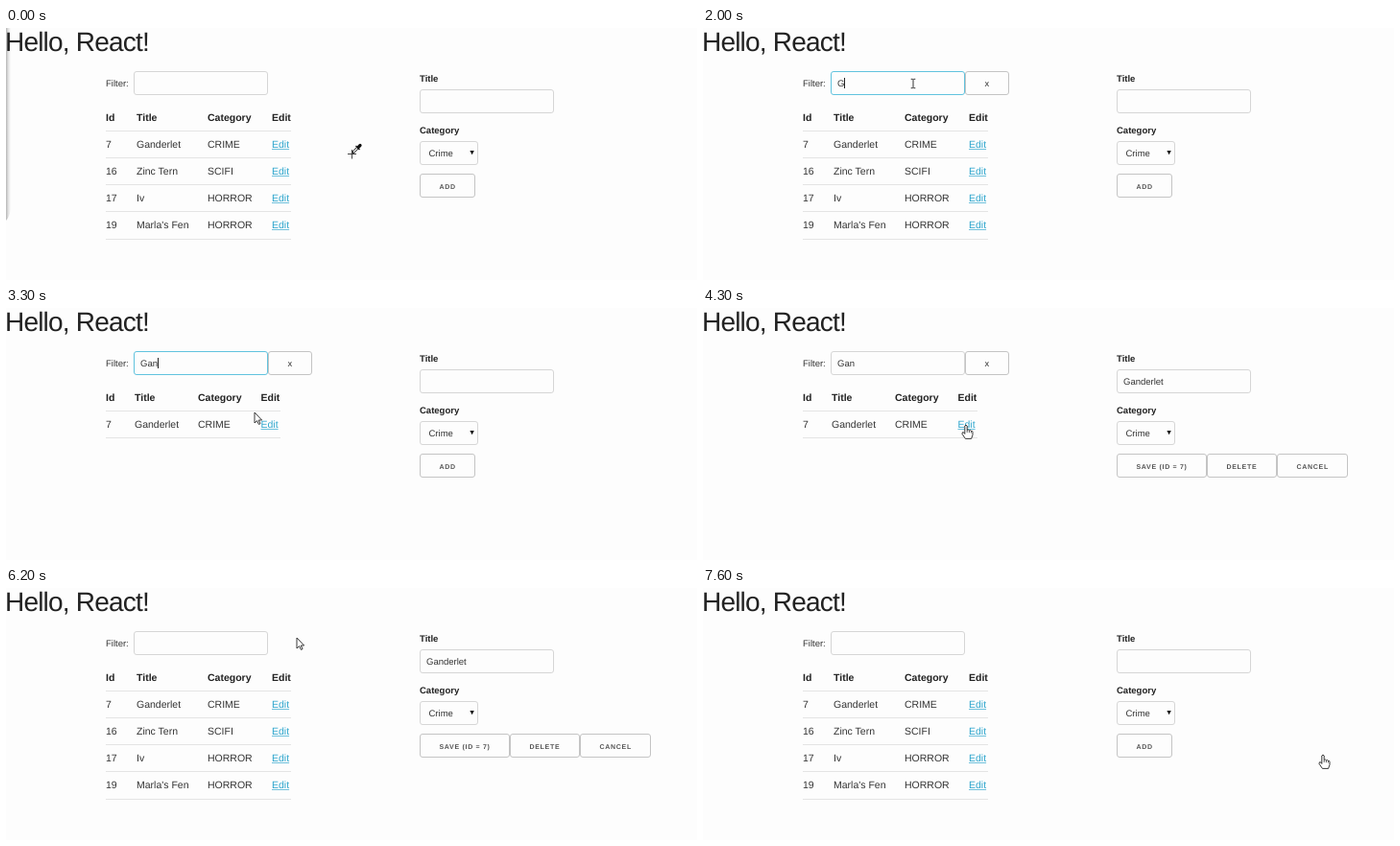
Animation, 720 px wide and 263 px high, one loop 8 s. Source, as an HTML page with a canvas:

```html
<!DOCTYPE html>
<html lang="en">
<head>
<meta charset="utf-8">
<title>Hello, React!</title>
<style>
  html, body { margin: 0; width: 100%; height: 100%; overflow: hidden; background: #fdfdfd; }
  canvas { display: block; }
</style>
</head>
<body>
<canvas id="stage" width="720" height="263"></canvas>
<script>
const ctx = document.getElementById('stage').getContext('2d');
const LOOP = 8000;
const FONT = '"Liberation Sans", Arial, sans-serif';
const INK = '#222';
const SOFT = '#333';
const RULE = '#e4e4e4';
const EDGE = '#d6d6d6';

const rows = [
  ['7', 'Ganderlet', 'CRIME'],
  ['16', 'Zinc Tern', 'SCIFI'],
  ['17', 'Iv', 'HORROR'],
  ['19', "Marla's Fen", 'HORROR']
];
const picked = rows[0];

// time, shape, hot spot x, y
const pointer = [
  [0, 'dropper', 361, 131],
  [700, 'arrow', 348, 120], [800, 'arrow', 300, 94],
  [900, 'beam', 245, 67], [1000, 'beam', 221, 62], [1500, 'beam', 219, 58],
  [3100, 'beam', 222, 66], [3200, 'arrow', 239, 88],
  [3300, 'arrow', 259, 109], [3400, 'arrow', 268, 115], [3600, 'hand', 274, 122],
  [5200, 'arrow', 276, 111], [5600, 'arrow', 288, 84],
  [5700, 'hand', 298, 63], [5900, 'hand', 303, 52],
  [6100, 'arrow', 303, 52], [6300, 'arrow', 350, 75], [6400, 'arrow', 470, 118],
  [6500, 'arrow', 590, 155], [6600, 'hand', 640, 169], [6800, 'hand', 644, 172],
  [6900, 'hand', 646, 174]
];

// time, number of letters typed in the filter
const typing = [[0, 0], [1900, 1], [2200, 2], [2500, 3], [6100, 0]];

const at = (list, t) => list.filter(step => step[0] <= t).pop();
const between = (t, from, to) => t >= from && t < to;

function text(str, x, y, size = 10.5, { bold = false, color = INK, gap = 0 } = {}) {
  ctx.font = `${bold ? 'bold ' : ''}${size}px ${FONT}`;
  ctx.letterSpacing = gap + 'px';
  ctx.textRendering = 'geometricPrecision';
  ctx.fillStyle = color;
  ctx.fillText(str, x, y);
  return ctx.measureText(str).width;
}

function box(x, y, w, h, color) {
  ctx.beginPath();
  ctx.roundRect(x + 0.5, y + 0.5, w - 1, h - 1, 2.5);
  ctx.strokeStyle = color;
  ctx.lineWidth = 1;
  ctx.stroke();
}

function line(x1, x2, y, color) {
  ctx.fillStyle = color;
  ctx.fillRect(x1, y, x2 - x1, 1);
}

function input(x, y, value, focused) {
  box(x, y, 140, 25, focused ? '#62c3de' : EDGE);
  const w = text(value, x + 7, y + 16.3, 9.5, { color: SOFT });
  if (focused) {
    ctx.fillStyle = INK;
    ctx.fillRect(Math.round(x + 7 + w), y + 7, 1, 11);
  }
}

function button(label, x, y, w, cursor) {
  const over = cursor[1] === 'hand' && between(cursor[2], x, x + w) && between(cursor[3], y, y + 25);
  box(x, y, w, 25, over ? '#999' : '#c4c4c4');
  text(label, x + 20.5, y + 15.6, 7, { bold: true, color: over ? '#333' : '#555', gap: 0.7 });
}

function table(filtered) {
  const cols = filtered ? [104, 134, 200, 265.5] : [104, 136, 210, 277];
  const end = filtered ? 286 : 297;
  ['Id', 'Title', 'Category', 'Edit'].forEach((h, i) => text(h, cols[i], 97, 10.5, { bold: true }));
  line(104, end, 107, RULE);
  (filtered ? [picked] : rows).forEach((row, i) => {
    const y = 125 + i * 28;
    row.forEach((cell, c) => text(cell, cols[c], y, 10.5, { color: SOFT }));
    const w = text('Edit', cols[3], y, 10.5, { color: '#2ea6cd' });
    line(cols[3], cols[3] + w, y + 1, '#6fc1dc');
    line(104, end, Math.round(135 + i * 28.2), RULE);
  });
}

function form(editing, cursor) {
  text('Title', 431, 56, 9.5, { bold: true });
  input(431, 64, editing ? picked[1] : '', false);
  text('Category', 431, 110, 9.5, { bold: true });
  box(431, 118, 61, 25, EDGE);
  text('Crime', 440.5, 134.3, 9.5, { color: SOFT });
  ctx.fillStyle = '#111';
  ctx.fill(new Path2D('M483.4 128h4.4l-2.2 4.2z'));
  if (editing) {
    button('SAVE (ID = 7)', 431, 152, 94, cursor);
    button('DELETE', 525, 152, 73, cursor);
    button('CANCEL', 598, 152, 74, cursor);
  } else {
    button('ADD', 431, 152, 58, cursor);
  }
}

function stroke(d, color, width) {
  ctx.strokeStyle = color;
  ctx.lineWidth = width;
  ctx.stroke(new Path2D(d));
}

function outlined(d) {
  ctx.fillStyle = '#fff';
  ctx.fill(new Path2D(d));
  stroke(d, INK, 0.9);
}

const shapes = {
  arrow() {
    outlined('M0 0V11L2.6 8.6L4.4 12.4L6 11.7L4.3 8H7.6Z');
  },
  hand() {
    outlined('M-1.2 8V1Q0 -.8 1.2 1V5.4Q2.6 4.4 3.4 5.8Q4.8 5 5.4 6.3Q7 6 7 7.6V10.4L5.6 14.4H-.6L-4 9.4Q-4 7 -2.4 7.8L-1.2 9.4Z');
    stroke('M1.2 5.4V8M3.4 5.8V8.2M5.4 6.3V8.4', INK, 0.7);
  },
  beam() {
    stroke('M-2.3 -4.7H-.5L0 -4.2L.5 -4.7H2.3M0 -4.2V4.2M-2.3 4.7H-.5L0 4.2L.5 4.7H2.3', '#333', 1);
  },
  dropper() {
    stroke('M-5 .5H4M-.5 -4V5.5', '#333', 0.9);
    stroke('M0 -.5L6 -6.5', '#222', 3);
    stroke('M1 -1.5L5.5 -6', '#eee', 1.5);
    stroke('M3.5 -8L7.5 -4', '#222', 1.4);
    ctx.lineCap = 'round';
    stroke('M6.2 -6.7L8 -8.5', '#111', 3.2);
    ctx.lineCap = 'butt';
  }
};

function edgeShadow() {
  const fade = ctx.createLinearGradient(0, 0, 5, 0);
  fade.addColorStop(0, 'rgba(0,0,0,.28)');
  fade.addColorStop(0.5, 'rgba(0,0,0,.1)');
  fade.addColorStop(1, 'rgba(0,0,0,0)');
  ctx.fillStyle = fade;
  ctx.beginPath();
  ctx.moveTo(0, 0);
  ctx.lineTo(5, 0);
  ctx.lineTo(5, 190);
  ctx.quadraticCurveTo(3, 198, 0, 201);
  ctx.fill();
}

function draw(t) {
  const cursor = at(pointer, t);
  const typed = at(typing, t)[1];

  ctx.fillStyle = '#fdfdfd';
  ctx.fillRect(0, 0, 720, 263);
  if (t < 1500) edgeShadow();

  text('Hello, React!', -1, 24, 28, { gap: -0.8 });
  text('Filter:', 104, 61, 9.5, { color: SOFT });
  if (typed) button('X', 273, 45, 46, cursor);
  input(133, 45, picked[1].slice(0, typed), between(t, 1300, 3800));
  table(between(t, 2200, 6100));
  form(between(t, 4300, 7600), cursor);

  ctx.save();
  ctx.translate(cursor[2], cursor[3]);
  shapes[cursor[1]]();
  ctx.restore();
}

function tick() {
  draw(performance.now() % LOOP);
  requestAnimationFrame(tick);
}
tick();
</script>
</body>
</html>
```
